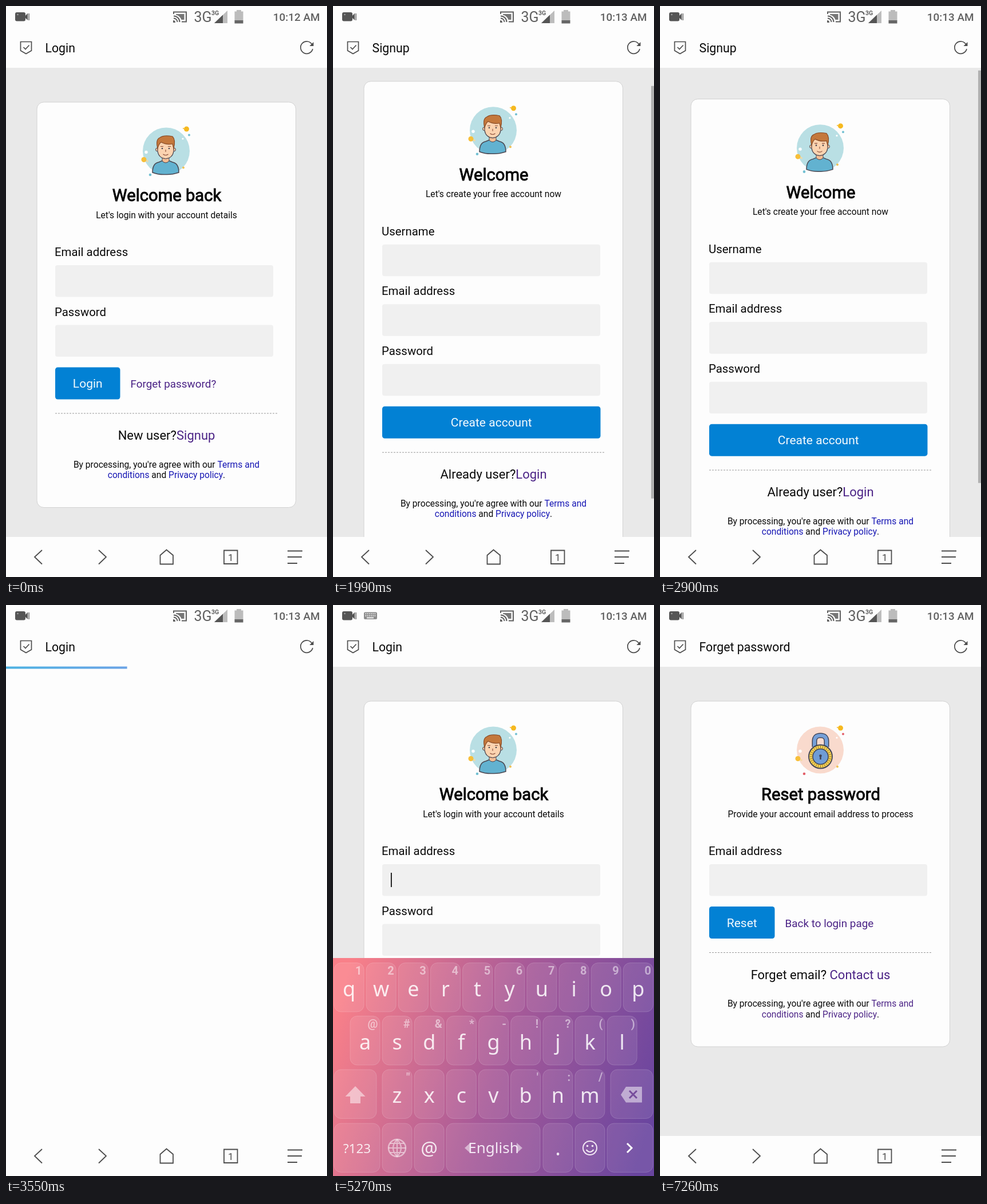
These frames come from a looping animation (561 px wide and 998 px high, 8660 ms). An HTML page with a canvas:

```html
<!DOCTYPE html>
<html lang="en">
<head>
<meta charset="utf-8">
<title>Account pages</title>
<style>
  html, body { margin: 0; width: 100%; height: 100%; overflow: hidden; background: #fdfdfd; }
  canvas { display: block; width: 561px; height: 998px; }
</style>
</head>
<body>
<canvas></canvas>
<script>
const W = 561, H = 998, LOOP = 8660, MID = 280.5, TOP = 108, BOTTOM = 928;
const WHITE = '#fdfdfd', INK = '#0a0a0a', ICON = '#4c4c4c', STATUS = '#606060';
const BLUE = '#1616b4', PURPLE = '#4b2386', BUTTON = '#0281d4';
const FONT = 'Roboto, sans-serif', KEY_FONT = '"Noto Sans", sans-serif';

const canvas = document.querySelector('canvas');
const dpr = window.devicePixelRatio || 1;
canvas.width = W * dpr;
canvas.height = H * dpr;
const ctx = canvas.getContext('2d');

const PAGES = {
  login: {
    title: 'Login', heading: 'Welcome back', sub: "Let's login with your account details",
    fields: ['Email address', 'Password'], button: 'Login', buttonWidth: 113.5,
    aside: 'Forget password?', prompt: 'New user?', link: 'Signup', terms: BLUE, art: drawAvatar
  },
  signup: {
    title: 'Signup', heading: 'Welcome', sub: "Let's create your free account now",
    fields: ['Username', 'Email address', 'Password'], button: 'Create account', buttonWidth: 381.5,
    prompt: 'Already user?', link: 'Login', terms: BLUE, art: drawAvatar
  },
  reset: {
    title: 'Forget password', heading: 'Reset password', sub: 'Provide your account email address to process',
    fields: ['Email address'], button: 'Reset', buttonWidth: 114.5,
    aside: 'Back to login page', prompt: 'Forget email? ', link: 'Contact us', terms: PURPLE, art: drawLock
  }
};

// Each load: start, end, page left, page reached.
const LOADS = [
  [860, 1510, 'login', 'signup'],
  [3120, 3820, 'signup', 'login'],
  [6350, 7150, 'login', 'reset']
];
const PROGRESS = [[.12, 0], [.614, .374], [.76, .65], [.93, 1]];
const SCROLL = [[1880, 0], [1990, 36], [2260, 112], [2420, 112], [2580, 98.5], [2700, 56], [2850, 10], [2960, 0]];

// Piecewise linear value at x for sorted [x, value] points.
function track(x, points) {
  if (x <= points[0][0]) return points[0][1];
  for (let i = 1; i < points.length; i++) {
    const [x0, a] = points[i - 1], [x1, b] = points[i];
    if (x < x1) return a + (b - a) * (x - x0) / (x1 - x0);
  }
  return points[points.length - 1][1];
}

function text(str, x, y, size, color = INK, align = 'left', weight = 400, family = FONT) {
  ctx.font = `${weight} ${size}px ${family}`;
  ctx.textAlign = align;
  ctx.fillStyle = color;
  ctx.fillText(str, x, y);
}

// A centred line made of differently coloured parts.
function runs(parts, y, size) {
  ctx.font = `400 ${size}px ${FONT}`;
  const widths = parts.map(([str]) => ctx.measureText(str).width);
  let x = MID - widths.reduce((a, b) => a + b) / 2;
  parts.forEach(([str, color], i) => {
    text(str, x, y, size, color);
    x += widths[i];
  });
}

function rect(x, y, w, h, fill) {
  ctx.fillStyle = fill;
  ctx.fillRect(x, y, w, h);
}

function paint(path, fill, stroke, width = 1.5) {
  if (fill) { ctx.fillStyle = fill; ctx.fill(path); }
  if (stroke) { ctx.strokeStyle = stroke; ctx.lineWidth = width; ctx.stroke(path); }
}

const shape = (d, fill, stroke, width) => paint(new Path2D(d), fill, stroke, width);

function box(x, y, w, h, r, fill, stroke, width) {
  const path = new Path2D();
  path.roundRect(x, y, w, h, r);
  paint(path, fill, stroke, width);
}

function dot(x, y, r, fill, stroke, width) {
  const path = new Path2D();
  path.arc(x, y, r, 0, 7);
  paint(path, fill, stroke, width);
}

function drawBubble(color, accent) {
  dot(280, 253.5, 41, color);
  dot(315.5, 215, 4.5, '#f6b91f');
  dot(310, 214, 1, '#f6b91f');
  dot(241, 268.5, 4.5, '#f7bf3a');
  dot(247, 271, 1.8, '#f5d9a0');
  dot(310, 282.5, 2, '#efc155');
  dot(320, 225.5, 2, accent);
  dot(252, 295, 2.3, accent);
  dot(245, 255.5, 2.7, '#fff');
  dot(309, 232, 1.6, '#fff');
}

function drawAvatar() {
  drawBubble('#b9dfe4', '#72c0d2');
  const line = '#4a4650';
  shape('M256 291 Q256 275 267 273 L274 270 H284 L291 273 Q302 275 302 291 Q290 295 279 294.500 Q266 295 256 291Z', '#62b2d0', line);
  shape('M273 264 V271 Q279 277 285 271 V264Z', '#f3bd94', line, 1);
  dot(264.500, 251, 3, '#f8cba6', line, 1);
  dot(293.500, 251, 3, '#f8cba6', line, 1);
  shape('M265 243 Q265 235 279 235 Q293 235 293 243 V254 Q291 266 279 267 Q267 266 265 254Z', '#fbd3b0', line, 1.2);
  shape('M265 249 Q261 233 269 230 Q276 225 291 228 Q297 234 293 249 L291 241 Q280 243 271 238 Q267 241 265 249Z', '#c4783c', '#8a4d28', 1.2);
  dot(273, 249, 1.3, line);
  dot(285, 249, 1.3, line);
  shape('M270 245.500 H275 M283 245.500 H288 M279 251 V255 M274.500 259 Q279 262.500 283.500 259', null, '#8a4d38', 1.1);
}

function drawLock() {
  drawBubble('#f9dacd', '#e2606a');
  const line = '#3f4356', shackle = 'M270 248 V238 Q270 228 280.500 228 Q291 228 291 238 V248';
  shape(shackle, null, line, 9);
  shape(shackle, null, '#76a0d8', 6);
  dot(280.5, 265, 20.5, '#f4cf50', line, 1.8);
  for (let i = 0; i < 28; i++) {
    const a = i * Math.PI / 14, c = Math.cos(a), s = Math.sin(a);
    shape(`M${280.5 + 15 * c} ${265 + 15 * s} L${280.5 + 19 * c} ${265 + 19 * s}`, null, '#8d7434', 1);
  }
  dot(280.5, 265, 13.5, '#6f9cd6', line, 1.6);
  dot(280.5, 263.5, 2.3, line);
  rect(279.2, 264, 2.6, 6, line);
}

function drawPage(page, scroll) {
  ctx.save();
  ctx.beginPath();
  ctx.rect(0, TOP, W, BOTTOM - TOP);
  ctx.clip();
  rect(0, TOP, W, BOTTOM - TOP, '#e9e9e9');
  ctx.translate(0, -scroll);

  const y = 527 + 104.5 * (page.fields.length - 1);
  box(54, 168, 452.5, y + 77, 12, WHITE, '#d2d2d2', 1);
  page.art();

  text(page.heading, MID + .5, 341, 29.2, '#050505', 'center');
  ctx.strokeStyle = '#050505';
  ctx.lineWidth = .9;
  ctx.strokeText(page.heading, MID + .5, 341);
  text(page.sub, MID, 370.5, 15.6, INK, 'center');

  page.fields.forEach((label, i) => {
    text(label, 85, 437 + 104.5 * i, 20.4);
    box(86, 453 + 104.5 * i, 381, 55.5, 4, '#f0f0f0');
  });

  box(86, y, page.buttonWidth, 56, 4.5, BUTTON);
  text(page.button, 86 + page.buttonWidth / 2, y + 35.5, 21, '#f4fafd', 'center');
  if (page.aside) text(page.aside, 104 + page.buttonWidth, y + 35.5, 18.9, PURPLE);

  ctx.setLineDash([3, 2]);
  shape(`M86 ${y + 80.5} H475`, null, '#999', 1);
  ctx.setLineDash([]);

  runs([[page.prompt, INK], [page.link, PURPLE]], y + 126.5, 22);
  runs([["By processing, you're agree with our ", INK], ['Terms and', page.terms]], y + 175, 15.6);
  runs([['conditions', page.terms], [' and ', INK], ['Privacy policy', page.terms], ['.', INK]], y + 193.5, 15.6);
  ctx.restore();
}

function drawStatus(t, typing) {
  box(16, 11, 18, 15.5, 3, '#555');
  shape('M34 17 L38 12.500 V25 L34 21Z', '#555');
  rect(39, 13, 2, 12, '#888');
  dot(20.5, 15, 1.2, '#aaa');
  if (typing) {
    box(54, 12.5, 23, 12.5, 2, '#8d8d8d');
    for (let i = 0; i < 12; i++) rect(56.5 + i % 6 * 3.2, 14.5 + Math.floor(i / 6) * 3.5, 1.7, 1.7, WHITE);
    rect(59, 21.5, 12, 1.8, WHITE);
  }
  shape('M293 14 V10.500 H315 V27.500 H307 M293 17.500 A10.500 10.500 0 0 1 303.500 28 M293 21.500 A6.500 6.500 0 0 1 299.500 28', null, STATUS, 2);
  shape('M292 25 A4 4 0 0 1 296 29 H292Z', STATUS);
  shape('M297 14 H311.500 V24 H306.500 Q304 17 297 15.500Z', '#777');

  text('3G', 328.5, 28, 25, STATUS);
  text('3G', 359, 16, 10.5, STATUS, 'left', 700);
  shape('M387 8 V30 H364Z', '#bdbdbd');
  shape('M379 15.500 V30 H364Z', '#555');
  rect(403, 7, 8, 3, '#bcbcbc');
  rect(399.5, 9.5, 15, 16, '#bcbcbc');
  rect(399.5, 25, 15, 5.5, '#666');
  text(t < 110 ? '10:12 AM' : '10:13 AM', 548.5, 26, 18.9, STATUS, 'right', 500);
}

function drawHeader(title) {
  rect(0, 0, W, TOP, WHITE);
  shape('M25.500 62.500 H44.500 V78 L35 83.500 L25.500 78Z M30.500 72 L34 75.500 L40.500 68.500', null, ICON, 1.7);
  text(title, 68.5, 80.5, 21.3);
  shape('M535 67.500 A10.700 10.700 0 1 0 536 75', null, ICON, 1.7);
  shape('M537.500 63 V70 H530.500Z', ICON);
}

function drawNav() {
  rect(0, BOTTOM, W, H - BOTTOM, WHITE);
  shape('M63 951 L50 963 L63 975.500 M162 951 L175 963 L162 975.500', null, ICON, 1.8);
  shape('M269.500 960 L280.500 950.500 L292 960 V975.500 H269.500Z', null, ICON, 1.8);
  shape('M381 951.500 H404.500 V975 H381Z', null, ICON, 1.8);
  text('1', 392.7, 969.5, 17, ICON, 'center');
  shape('M492 952.500 H518 M492 963 H517 M492 974 H509', null, ICON, 1.8);
}

function drawKeyboard(top) {
  ctx.save();
  ctx.translate(0, top - 617);
  const back = ctx.createLinearGradient(0, 720, W, 900);
  back.addColorStop(0, '#f98089');
  back.addColorStop(.5, '#a85a98');
  back.addColorStop(1, '#69459f');
  rect(0, 617, W, 381, back);

  const pale = 'rgba(255,255,255,.85)', faint = 'rgba(255,255,255,.5)';
  const key = (x, y, w = 52) => box(x, y, w, 85.5, 12, 'rgba(255,255,255,.09)', 'rgba(255,255,255,.17)', 1);
  const row = (x, y, letters, hints) => [...letters].forEach((letter, i) => {
    const left = x + 56.15 * i;
    key(left, y);
    text(letter, left + 26, y + 58, 36, pale, 'center', 400, KEY_FONT);
    text(hints[i], left + 48.5, y + 20, 20, faint, 'right', 700);
  });
  row(2, 625.5, 'qwertyuiop', '1234567890');
  row(30, 718.5, 'asdfghjkl', '@#&*-!?()');
  row(86, 812, 'zxcvbnm', '"   \':/');

  key(2, 812, 74);
  shape('M39 841 L56.500 859 H48 V871 H30 V859 H21.500Z', faint);
  key(485, 812, 74);
  shape('M503 856 L512 842 H540 V869.500 H512Z', faint);
  shape('M518 849 L531 862 M531 849 L518 862', null, '#774d9c', 3);

  key(2, 906, 80);
  text('?123', 42, 957.5, 22.5, pale, 'center', 400, KEY_FONT);
  key(86, 906);
  dot(112, 949, 15, null, faint, 2.5);
  shape('M112 934 V964 M97 949 H127 M100 941 H124 M100 957 H124 M112 934 Q98 949 112 964 Q126 949 112 934', null, faint, 2);
  key(142, 906);
  text('@', 168, 962, 33, pale, 'center', 400, KEY_FONT);
  key(198, 906, 164);
  shape('M230 949 L240 940 V958Z M331 949 L321 940 V958Z', faint);
  text('English', MID, 957.5, 26, '#f3e8f4', 'center', 400, KEY_FONT);
  key(367, 906);
  text('.', 393, 962, 36, pale, 'center', 400, KEY_FONT);
  key(423, 906);
  dot(449, 949, 12, null, '#f3e8f4', 2);
  dot(444.5, 945.5, 1.8, '#f3e8f4');
  dot(453.5, 945.5, 1.8, '#f3e8f4');
  shape('M442.500 952 Q449 960 455.500 952', null, '#f3e8f4', 2);
  key(479, 906, 80);
  shape('M514 941 L522 949 L514 957', null, '#fff', 3);
  ctx.restore();
}

function pageState(t) {
  let name = 'login', blank = false, progress = 0;
  for (const [start, end, from, to] of LOADS) {
    if (t < start) break;
    const u = (t - start) / (end - start);
    name = u < .45 ? from : to;
    blank = u >= .45 && u < .74;
    progress = u < .97 ? track(u, PROGRESS) : 0;
  }
  return { page: PAGES[name], blank, progress };
}

function draw(t) {
  ctx.setTransform(dpr, 0, 0, dpr, 0, 0);
  rect(0, 0, W, H, WHITE);
  const { page, blank, progress } = pageState(t);
  const scroll = track(t, SCROLL);

  if (!blank) {
    drawPage(page, scroll);
    if (page === PAGES.signup && t >= 1880) {
      ctx.globalAlpha = track(t, [[3120, 1], [3340, 0]]);
      rect(556, TOP + scroll * .875, 5, 721, '#b1b1b1');
      ctx.globalAlpha = 1;
    }
  }
  if (t >= 4960 && t < 5620) rect(101, 468, 1.8, 25, '#111');

  drawHeader(page.title);
  drawStatus(t, t >= 4960 && t < 6050);
  drawNav();

  if (progress > 0) {
    const width = W * progress, bar = ctx.createLinearGradient(0, 0, width, 0);
    bar.addColorStop(0, '#4db2e2');
    bar.addColorStop(1, '#6ba3e6');
    rect(0, 107.5, width, 4, bar);
  }

  const shown = track(t, [[4970, 0], [5220, 1], [5920, 1], [6170, 0]]);
  if (shown > 0) drawKeyboard(H - 381 * (1 - (1 - shown) ** 2));
}

const begin = performance.now();
function tick() {
  draw((performance.now() - begin) % LOOP);
  requestAnimationFrame(tick);
}
tick();
</script>
</body>
</html>
```
